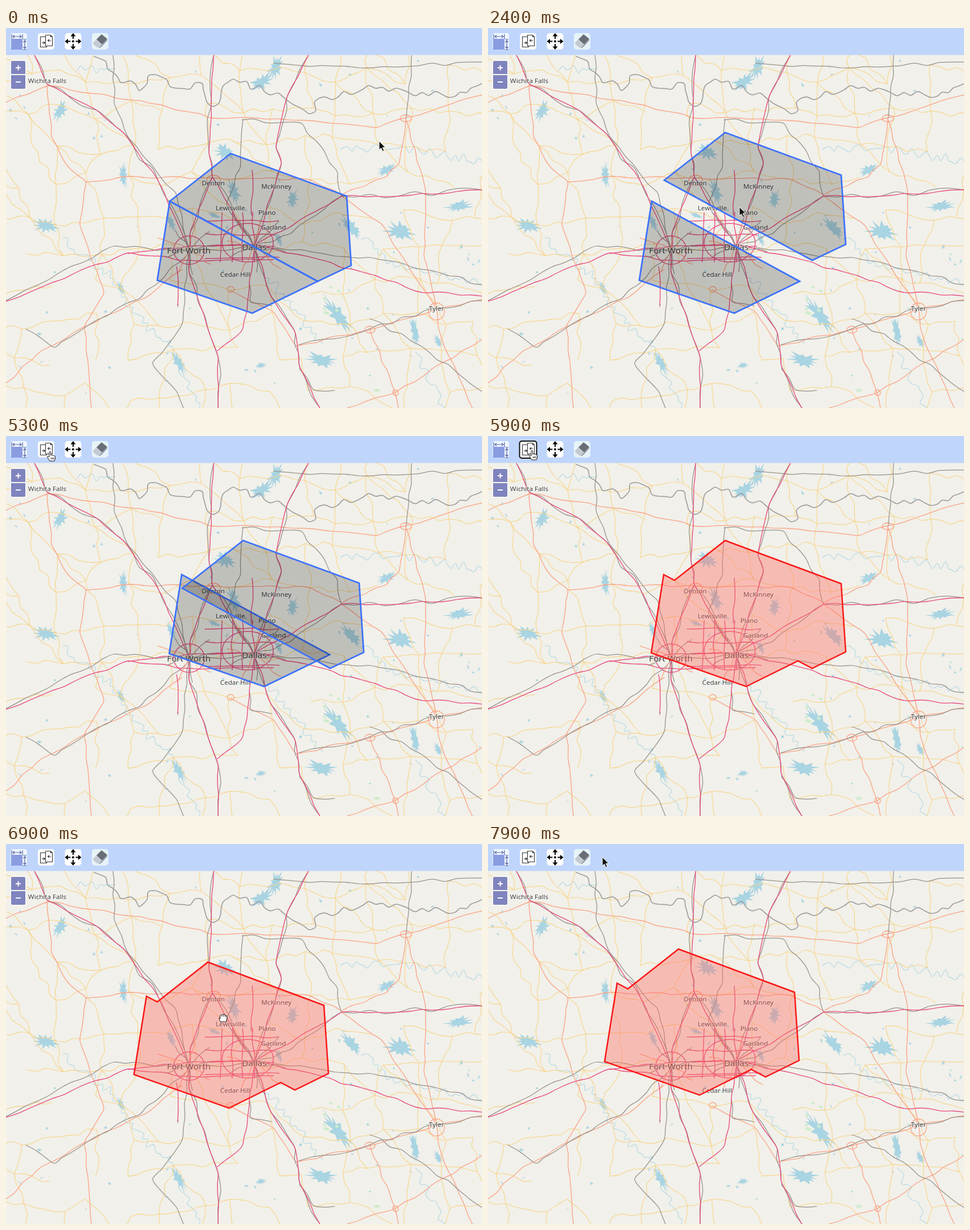
Write an HTML page that moves like this. It is 837x669 px and loops after 8 s.

```html
<!DOCTYPE html>
<html lang="en">
<head>
<meta charset="utf-8">
<title>Map polygon tools</title>
<style>
html, body { margin: 0; width: 100%; height: 100%; overflow: hidden; }
svg { display: block; width: 837px; height: 669px; background: #f1f0ea; }
#map path { fill: none; stroke-linejoin: round; stroke-linecap: round; }
#map .lake { fill: #a9d4e2; }
#map .wood { fill: #cdeccb; }
#map .river { stroke: #b2d8e5; stroke-width: 1.1; }
#map .primary { stroke: #f8d488; stroke-width: 1.1; }
#map .trunk { stroke: #fba284; stroke-width: 1.3; }
#map .rail { stroke: #98918a; stroke-width: 1.25; }
#map .border { stroke: #a09f9f; stroke-width: 1.7; }
#map .motorway { stroke: #e84c7f; stroke-width: 1.35; }
#labels { font: 11.6px "Noto Sans", "Open Sans", sans-serif; fill: #3a3a3a; text-anchor: middle;
  stroke: rgba(255,255,255,.6); stroke-width: 2px; paint-order: stroke; stroke-linejoin: round; }
#labels .city { font-size: 15.2px; }
.blue { fill: rgba(0,0,0,.2); stroke: #3d72fb; stroke-width: 2.8; }
.red { fill: rgba(255,110,100,.4); stroke: #fb1818; stroke-width: 2.5; }

.anim { animation: 8s step-end infinite; }
#upper { animation-name: upper; }
#lower { animation-name: lower; }
#merged { animation-name: merged; }
#pair { animation-name: pair; }
#ring { animation-name: ring; }
#cursor { animation-name: cursor; }
#arrow { animation-name: arrow; }
#hand { animation-name: hand; }
#grab1 { animation-name: grab1; }
#grab2 { animation-name: grab2; }

@keyframes upper {
  0% { transform: translate(0, 0); }
  23.75% { transform: translate(0, 0); animation-timing-function: steps(4, start); }
  28.75%, 100% { transform: translate(22px, -37px); }
}
@keyframes lower {
  0% { transform: translate(0, 0); }
  57.5%, 100% { transform: translate(21px, -61px); }
}
@keyframes pair { 0% { opacity: 1; } 73.75%, 100% { opacity: 0; } }
@keyframes merged {
  0% { opacity: 0; transform: translate(0, 0); }
  73.75% { opacity: 1; transform: translate(0, 0); }
  80% { opacity: 1; transform: translate(0, 0); animation-timing-function: steps(3, start); }
  83.75% { opacity: 1; transform: translate(-79px, 12px); }
  85% { opacity: 1; transform: translate(-96px, 15px); }
  86.25% { opacity: 1; transform: translate(-62px, 24px); }
  87.5% { opacity: 1; transform: translate(-40px, 20px); }
  88.75% { opacity: 1; transform: translate(-81px, 13px); }
  91.25% { opacity: 1; transform: translate(-69px, 15px); }
  92.5% { opacity: 1; transform: translate(-78px, 2px); }
  93.75% { opacity: 1; transform: translate(-82px, 4px); }
  96.25%, 100% { opacity: 1; transform: translate(-82px, 1px); }
}
@keyframes ring { 0% { opacity: 0; } 72.5% { opacity: 1; } 80%, 100% { opacity: 0; } }
@keyframes cursor {
  0% { transform: translate(656px, 199px); }
  13.75% { transform: translate(656px, 199px); animation-timing-function: steps(5, start); }
  20% { transform: translate(430px, 350px); animation-timing-function: steps(2, start); }
  22.5% { transform: translate(434px, 326px); }
  30% { transform: translate(442px, 315px); }
  57.5% { transform: translate(374px, 306px); }
  58.75% { transform: translate(374px, 306px); animation-timing-function: steps(5, start); }
  65% { transform: translate(66px, 30px); }
  66.25% { transform: translate(72px, 27px); }
  73.75% { transform: translate(72px, 25px); }
  75% { transform: translate(72px, 25px); animation-timing-function: steps(4, start); }
  80% { transform: translate(444px, 281px); }
  97.5% { transform: translate(275px, 140px); }
  98.75%, 100% { transform: translate(201px, 23px); }
}
@keyframes arrow {
  0% { opacity: 1; } 23.75% { opacity: 0; } 30% { opacity: 1; } 65% { opacity: 0; }
  75% { opacity: 1; } 80% { opacity: 0; } 97.5%, 100% { opacity: 1; }
}
@keyframes hand { 0% { opacity: 0; } 65% { opacity: 1; } 75%, 100% { opacity: 0; } }
@keyframes grab1 { 0% { opacity: 0; } 23.75% { opacity: 1; } 30%, 100% { opacity: 0; } }
@keyframes grab2 { 0% { opacity: 0; } 80% { opacity: 1; } 97.5%, 100% { opacity: 0; } }
</style>
</head>
<body>
<svg viewBox="0 0 837 669">
  <defs>
    <g id="fist" fill="#fff" stroke="#111" stroke-width="1" stroke-linejoin="round">
      <path d="M3 14L1 9.500Q0 7 2.500 6.500V3Q3.500 1 5.500 2 7 .2 9 1.500 11 .8 12 2.800 14.500 2.500 14.500 5V9L13 14z"/>
      <path d="M5.700 2.500V5M9 2V5M12 3V5.500M2.500 6.500V9"/>
    </g>
    <path id="tip" d="M118 9l4.500 5.500h-3.500v4.500h-2v-4.500h-3.500z"/>
  </defs>
  <g id="map"></g>
  <g id="labels">
    <text x="72.5" y="97">Wichita Falls</text>
    <text x="364.5" y="277">Denton</text>
    <text x="475.5" y="282.5">McKinney</text>
    <text x="394.5" y="320.5">Lewisville</text>
    <text x="459" y="328.5">Plano</text>
    <text x="470.5" y="354.5">Garland</text>
    <text x="403" y="437.5">Cedar Hill</text>
    <text x="757" y="497.5">Tyler</text>
    <text x="321.5" y="396.5" class="city">Fort Worth</text>
    <text x="436.5" y="390.5" class="city">Dallas</text>
  </g>

  <g id="pair" class="anim">
    <polygon id="lower" class="blue anim" points="288,305 548,446 433,502 266,444"/>
    <g id="upper" class="anim">
      <polygon class="blue" points="395,221 599,296 607,418 548,446 288,305"/>
      <g id="grab1" class="anim"><use href="#fist" x="430" y="324"/></g>
    </g>
  </g>
  <g id="merged" class="anim">
    <polygon class="red" points="309,244 328,254 417,184 621,260 629,380 570,409 545,396 454,441 287,382"/>
    <g id="grab2" class="anim"><use href="#fist" x="436" y="275"/></g>
  </g>

  <g id="zoom">
    <rect x="7" y="56" width="29" height="53" rx="4" fill="#fff" opacity=".5"/>
    <path d="M9 81V60q0-2 2-2h21q2 0 2 2v21zM9 83h25v22q0 2-2 2H11q-2 0-2-2z" fill="#7f84be"/>
    <path d="M17 70h9M21.500 65.500v9M17 95h9" stroke="#fff" stroke-width="2"/>
  </g>

  <g id="toolbar">
    <rect width="837" height="47.5" fill="#bfd5fc"/>
    <g fill="#fff">
      <rect x="8" y="9" width="29" height="29" rx="4" opacity=".75"/>
      <rect x="56" y="9" width="29" height="29" rx="5"/>
      <rect x="103.5" y="9" width="29" height="29" rx="5"/>
      <rect x="151" y="9" width="29" height="29" rx="5" fill="#e6f3f8"/>
    </g>
    <rect x="9" y="19" width="20" height="19" fill="#8a9ce0"/>
    <g fill="none" stroke="#56679f" stroke-width="1.2">
      <path d="M10 11v8M29 11v8M13 15h13M15 12.500l-3 2.500 3 2.500M24 12.500l3 2.500-3 2.500"/>
      <path d="M30 20h6M30 38h6M33 23v12M30.500 25l2.500-3 2.500 3M30.500 33l2.500 3 2.500-3"/>
    </g>
    <g fill="#fff" stroke="#333" stroke-width="1.1">
      <path d="M60.500 15.500h11v18h-11z"/>
      <path d="M69.500 12.500h9l3 3v16h-12zM78.500 12.500v3h3"/>
      <path d="M63 26h5M66 24l2.500 2-2.500 2M79 22h-5M76 20l-2.500 2 2.500 2" fill="none"/>
    </g>
    <circle cx="118" cy="23.5" r="2"/>
    <use href="#tip"/>
    <use href="#tip" transform="rotate(90 118 23.5)"/>
    <use href="#tip" transform="rotate(180 118 23.5)"/>
    <use href="#tip" transform="rotate(270 118 23.5)"/>
    <path d="M168 11l10 8-9 10-10-9z" fill="#686d76"/>
    <path d="M159 20l10 9-5 5q-2 1-4 0l-6-5q-2-2 0-4z" fill="#c6cbd2"/>
    <path d="M169 29l9-10v3l-9 10-5 4v-2z" fill="#9298a2"/>
    <rect id="ring" class="anim" x="55.5" y="9" width="30" height="30" rx="4" fill="none" stroke="#111" stroke-width="2"/>
  </g>

  <g id="cursor" class="anim" stroke-linejoin="round">
    <path id="arrow" class="anim" d="M0 0V15.500L3.600 12.300 6.200 18.200 8.800 17 6.300 11.300H11z" fill="#111" stroke="#fff"/>
    <g id="hand" class="anim" fill="#fff" stroke="#111">
      <path d="M5 17L1 11Q-.5 8.500 1.500 8.500L4 10V2Q4 .5 5.300.5T6.700 2V7Q8.500 5.500 9.500 7.200 11.500 6 12.300 8 14.500 7.500 14.500 9.500V13L13 17z"/>
      <path d="M7.500 11v3M9.700 11v3M11.900 11v3"/>
    </g>
  </g>
</svg>
<script>
const map = document.getElementById('map');
let seed = 11;
function rand() {
  seed = (seed * 16807) % 2147483647;
  return seed / 2147483647;
}
const spread = size => (rand() - 0.5) * size;

function add(kind, d) {
  const el = document.createElementNS('http://www.w3.org/2000/svg', 'path');
  el.setAttribute('class', kind);
  el.setAttribute('d', d);
  map.append(el);
}

// Catmull-Rom curve
function curve(p) {
  const at = i => p[Math.max(0, Math.min(p.length - 1, i))];
  let d = 'M' + p[0];
  for (let i = 0; i < p.length - 1; i++) {
    const [a, b, c, e] = [at(i - 1), at(i), at(i + 1), at(i + 2)];
    const c1 = b.map((v, k) => v + (c[k] - a[k]) / 6);
    const c2 = c.map((v, k) => v - (e[k] - b[k]) / 6);
    d += `C${c1} ${c2} ${c}`;
  }
  return d;
}

// Adds sideways bends between key points, one every `step` pixels
function bend(p, size, step) {
  const out = [p[0]];
  for (let i = 1; i < p.length; i++) {
    const [x, y] = p[i - 1], [u, v] = p[i];
    const len = Math.hypot(u - x, v - y), n = Math.ceil(len / step);
    for (let k = 1; k < n; k++) {
      const s = spread(size), t = k / n;
      out.push([x + (u - x) * t - (v - y) / len * s, y + (v - y) * t + (u - x) / len * s]);
    }
    out.push(p[i]);
  }
  return out;
}
const points = text => text.split(' ').map(s => s.split(',').map(Number));
const road = (kind, text, size = 4, step = 22) => add(kind, curve(bend(points(text), size, step)));
const trunk = text => road('trunk', text);
const rail = text => road('rail', text, 6);
const river = text => road('river', text, 16, 7);

// A motorway with a railway winding beside it
function corridor(text) {
  road('rail', text, 12, 30);
  road('motorway', text, 3);
}
function loop(kind, x, y, rx, ry) {
  add(kind, `M${x - rx},${y}a${rx},${ry} 0 1 0 ${2 * rx},0a${rx},${ry} 0 1 0 ${-2 * rx},0`);
}

// Ragged blob with long and short arms, stretched along one axis
function blob(kind, x, y, long, wide, turn) {
  const c = Math.cos(turn), s = Math.sin(turn), n = 22;
  const ring = Array.from({ length: n }, (_, i) => {
    const a = i / n * 2 * Math.PI, r = i % 2 ? 0.3 + rand() * 0.25 : 0.65 + rand() * 0.4;
    const u = long * r * Math.cos(a), v = wide * r * Math.sin(a);
    return [x + u * c - v * s, y + u * s + v * c];
  });
  add(kind, `M${ring.join(' ')}z`);
}
const lake = (...size) => blob('lake', ...size);

function drawWater() {
  river('125,75 192,72');
  river('588,214 690,212 837,234');
  river('100,370 190,442 240,520 300,575 340,669');
  river('455,430 500,486 556,556');
  river('625,372 690,420 837,450');
  river('720,570 772,669');
  lake(450, 95, 28, 15, -0.6);
  lake(474, 70, 28, 14, 1.9);
  lake(95, 146, 23, 13, -1.1);
  lake(385, 218, 24, 16, 0.3);
  lake(400, 288, 30, 13, 1.3);
  lake(366, 330, 16, 6, 0.4);
  lake(290, 342, 22, 7, 1.2);
  lake(504, 302, 22, 12, 1.8);
  lake(480, 373, 18, 7, 1.1);
  lake(608, 352, 30, 13, 0.8);
  lake(692, 358, 31, 20, 0.2);
  lake(670, 249, 25, 10, -0.4);
  lake(796, 314, 30, 12, -0.2);
  lake(207, 260, 26, 9, 1.5);
  lake(70, 348, 28, 16, 0.2);
  lake(202, 458, 18, 7, 1.1);
  lake(582, 504, 48, 14, 0.9);
  lake(555, 585, 36, 15, 0.2);
  lake(719, 535, 36, 9, 1.4);
  lake(760, 552, 16, 7, 1);
  lake(304, 590, 32, 9, 1);
  lake(448, 594, 13, 6, -0.2);
  for (let i = 0; i < 70; i++) {
    lake(rand() * 837, 50 + rand() * 619, 2 + rand() * 4, 1 + rand() * 3, rand() * 3);
  }
  for (let i = 0; i < 7; i++) blob('wood', 575 + spread(30), 490 + spread(70), 5, 4, rand());
  blob('wood', 652, 638, 9, 5, 0);
}

// Country roads: a loose grid of towns, each joined to its neighbours
function drawCountry(cell = 62) {
  const cols = Math.ceil(837 / cell) + 2, rows = Math.ceil(620 / cell) + 2;
  const towns = Array.from({ length: cols * rows }, (_, i) =>
    [(i % cols - 0.5) * cell + spread(34), 20 + Math.floor(i / cols) * cell + spread(34)]);
  const join = (a, b, chance) => {
    if (towns[b] && rand() < chance) add('primary', curve(bend([towns[a], towns[b]], 9, 20)));
  };
  towns.forEach((_, i) => {
    if ((i + 1) % cols) {
      join(i, i + 1, 0.75);
      join(i, i + cols + 1, 0.2);
    }
    join(i, i + cols, 0.65);
  });
}

function drawTrunks() {
  trunk('0,131 75,102 275,136 360,158 480,160 652,175 703,158 837,118');
  trunk('72,100 80,190 110,245 140,271 130,345 172,465 138,526 150,669');
  trunk('140,271 205,262 365,264 530,266 590,294');
  trunk('703,160 690,240 668,262 590,294');
  trunk('0,625 60,570 138,526 245,475 310,425');
  trunk('510,560 640,531 757,495 837,478');
  trunk('590,296 660,345 757,495 764,540 820,669');
  trunk('640,531 684,642 690,669');
  trunk('600,669 684,642 837,548');
  trunk('395,462 470,500 510,560');
  trunk('703,160 738,290 735,400 757,495');
  loop('trunk', 757, 499, 14, 15);
  loop('trunk', 640, 531, 9, 6);
  loop('trunk', 703, 159, 10, 6);
  loop('trunk', 685, 642, 5, 5);
  loop('trunk', 365, 268, 12, 9);
  loop('trunk', 395, 460, 6, 5);
}

function drawRails() {
  road('border', '155,50 188,78 234,110 262,82 300,106 345,98 362,138 400,90 488,122 534,151 550,124 650,106 790,120 837,98', 14, 12);
  rail('188,48 190,130 215,192 298,290 322,390');
  rail('417,160 412,245 388,310 436,385');
  rail('415,162 520,168 582,252 590,296');
  rail('470,62 620,70 837,60');
  rail('713,48 704,158');
  rail('0,480 190,384 322,392 436,386 640,404 760,430 837,452');
  rail('322,395 310,520 258,590 300,640 312,669');
  rail('35,530 85,562 142,525 235,476 320,398');
  rail('428,450 430,482 468,489');
  rail('515,558 600,543 757,493 837,480');
  rail('640,512 730,560 837,640');
  rail('516,600 540,636 578,638');
  rail('590,296 500,362 436,386');
}

function drawMotorways() {
  corridor('50,48 72,98 160,145 208,186 268,270 322,390');
  corridor('365,48 357,220 363,262 437,388');
  corridor('363,262 324,360 322,430 373,580 373,669');
  corridor('532,48 494,122 475,210 484,238 438,385 465,470 508,535 516,595 552,669');
  road('motorway', '437,388 425,480 415,532 372,568');
  road('motorway', '0,481 120,432 215,396 322,409 470,408');
  road('motorway', '437,381 510,398 650,436 720,463 837,472');
  road('motorway', '215,397 322,384 437,381 500,350 590,296');
  corridor('590,296 690,296 837,285');
  road('motorway', '300,420 302,490');
  // City grid, beltways and spokes
  for (let x = 380; x < 440; x += 18) road('motorway', `${x},325 ${x + spread(8)},412`);
  for (let y = 340; y < 420; y += 22) road('motorway', `350,${y} ${475 + spread(20)},${y + spread(10)}`);
  road('motorway', '433,250 432,330');
  loop('motorway', 322, 391, 27, 25);
  loop('motorway', 425, 378, 45, 34);
  for (let a = 0; a < 9; a++) {
    for (const [x, y] of [[322, 390], [437, 386]]) {
      const t = a * 0.7 + spread(0.3), r = 40 + rand() * 25;
      road(a % 2 ? 'trunk' : 'rail', `${x},${y} ${x + r * Math.cos(t)},${y + r * Math.sin(t)}`, 6, 15);
    }
  }
}

drawWater();
drawCountry();
drawTrunks();
drawRails();
drawMotorways();
</script>
</body>
</html>
```
